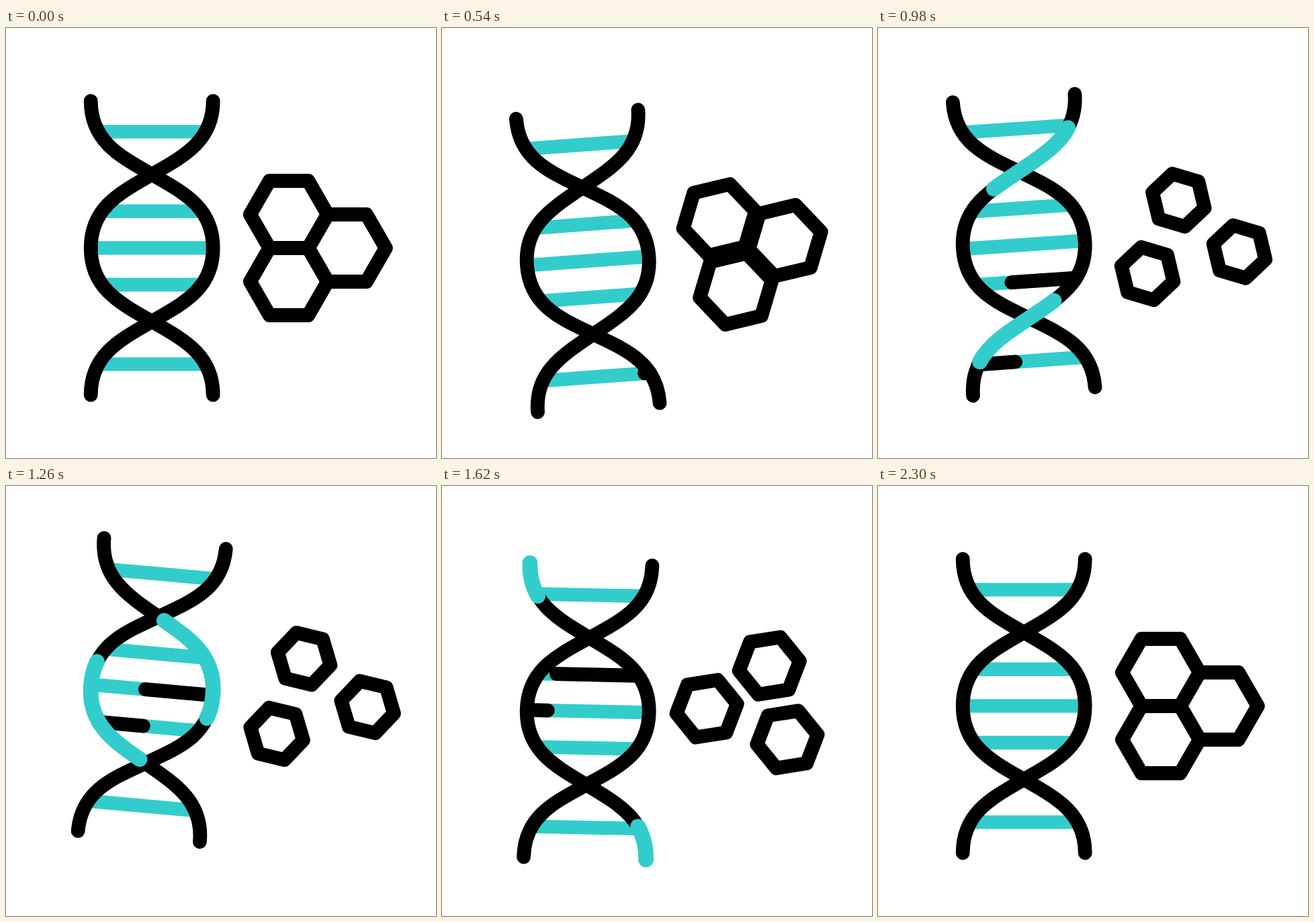
Animation of 640 by 640 pixels, one loop 2.4 s. Source, as an HTML page without scripts:

```html
<!DOCTYPE html>
<html lang="en">
<head>
<meta charset="utf-8">
<title>DNA and molecules</title>
<style>
  @property --head { syntax: '<number>'; inherits: false; initial-value: 0; }
  @property --tail { syntax: '<number>'; inherits: false; initial-value: 0; }

  html, body { margin: 0; width: 100%; height: 100%; overflow: hidden; background: #fff; }
  svg { display: block; width: 100%; height: 100%; }
  path { fill: none; stroke: #000; stroke-width: 20.8; stroke-linecap: round; stroke-linejoin: round; }

  .helix, .ring, .hex, .pulse, .fill {
    animation: 2.4s cubic-bezier(.3333, 0, .6667, 1) infinite;
  }
  .helix { animation-name: bob, tilt; }
  .ring { animation-name: spin; }
  .hex { translate: var(--in); animation-name: part; }
  #cell { vector-effect: non-scaling-stroke; }

  .rungs { stroke: #33cccc; stroke-width: 20.4; stroke-linecap: butt; }

  /* a stretch of line between tail and head, in percent of its length */
  .pulse, .fill {
    visibility: hidden;
    stroke-dasharray: calc((var(--head) - var(--tail)) * 1px) 300px;
    stroke-dashoffset: calc(var(--tail) * -1px);
  }
  .pulse { stroke: #33cccc; stroke-width: 22.8; animation-name: head, tail, show; animation-delay: .6s; }
  .fill { animation-name: sweep; animation-delay: calc(.5s + var(--i) * .3s); }

  @keyframes bob {
    0%, 8.333% { translate: 0 0; }
    29.167% { translate: 0 25.3px; }
    50% { translate: 0 -25.3px; }
    70.833% { translate: 0 10.3px; }
    91.667%, 100% { translate: 0 0; }
  }
  @keyframes tilt {
    0%, 8.333% { rotate: 0deg; }
    33.333% { rotate: -7deg; }
    58.333% { rotate: 7deg; }
    75% { rotate: -3deg; }
    91.667%, 100% { rotate: 0deg; }
  }
  @keyframes spin {
    0%, 16.5% { rotate: 0deg; }
    43.6%, 55% { rotate: -106.4deg; }
    86.4%, 100% { rotate: 0deg; }
  }
  @keyframes part {
    0%, 16.667% { translate: var(--in); scale: 1; }
    41.667%, 58.333% { translate: var(--out); scale: .7; }
    83.333%, 100% { translate: var(--in); scale: 1; }
  }
  @keyframes head {
    0% { --head: 0; }
    41.667%, 100% { --head: 100; }
  }
  @keyframes tail {
    0%, 8.333% { --tail: 0; }
    50%, 100% { --tail: 100; }
  }
  @keyframes show {
    0% { visibility: hidden; }
    25% { visibility: visible; }
    50%, 100% { visibility: hidden; }
  }
  @keyframes sweep {
    0% { --head: 0; --tail: 0; visibility: hidden; }
    12.5% { --head: 100; --tail: 0; visibility: visible; }
    25%, 100% { --head: 100; --tail: 100; visibility: hidden; }
  }
</style>
</head>
<body>
<svg viewBox="0 0 640 640">
  <defs>
    <path id="cell" d="M57.7 0L28.85 50H-28.85L-57.7 0L-28.85 -50H28.85Z"/>
  </defs>

  <g transform="translate(217.2 327.4)">
    <g class="helix">
      <path class="rungs" d="M-80-173H80M-73-54.6H73M-91 0H91M-73 54.6H73M-80 173H80"/>
      <path class="fill" style="--i:0" pathLength="100" d="M80 173H-80"/>
      <path class="fill" style="--i:1" pathLength="100" d="M73 54.6H-73"/>
      <path class="fill" style="--i:2" pathLength="100" d="M91 0H-91"/>
      <path class="fill" style="--i:3" pathLength="100" d="M73-54.6H-73"/>
      <path class="fill" style="--i:4" pathLength="100" d="M80-173H-80"/>

      <path id="strand" d="M91-218.8C91-159 48-137 0-109.4S-91-60-91 0S-48 82 0 109.4S91 159 91 218.8"/>
      <use href="#strand" transform="rotate(180)"/>
      <path class="pulse" pathLength="100" d="M91-218.8C91-159 48-137 0-109.4S-91-60-91 0S-48 82 0 109.4S91 159 91 218.8"/>
      <path class="pulse" pathLength="100" transform="rotate(180)" d="M91-218.8C91-159 48-137 0-109.4S-91-60-91 0S-48 82 0 109.4S91 159 91 218.8"/>
    </g>
  </g>

  <g transform="translate(464.3 327.5)">
    <g class="ring">
      <g class="hex" style="--in:-43.3px -50px; --out:-22.3px -70.4px"><use href="#cell"/></g>
      <g class="hex" style="--in:-43.3px 50px; --out:-22.3px 70.4px"><use href="#cell"/></g>
      <g class="hex" style="--in:43.3px 0px; --out:73.3px 0px"><use href="#cell"/></g>
    </g>
  </g>
</svg>
</body>
</html>
```
